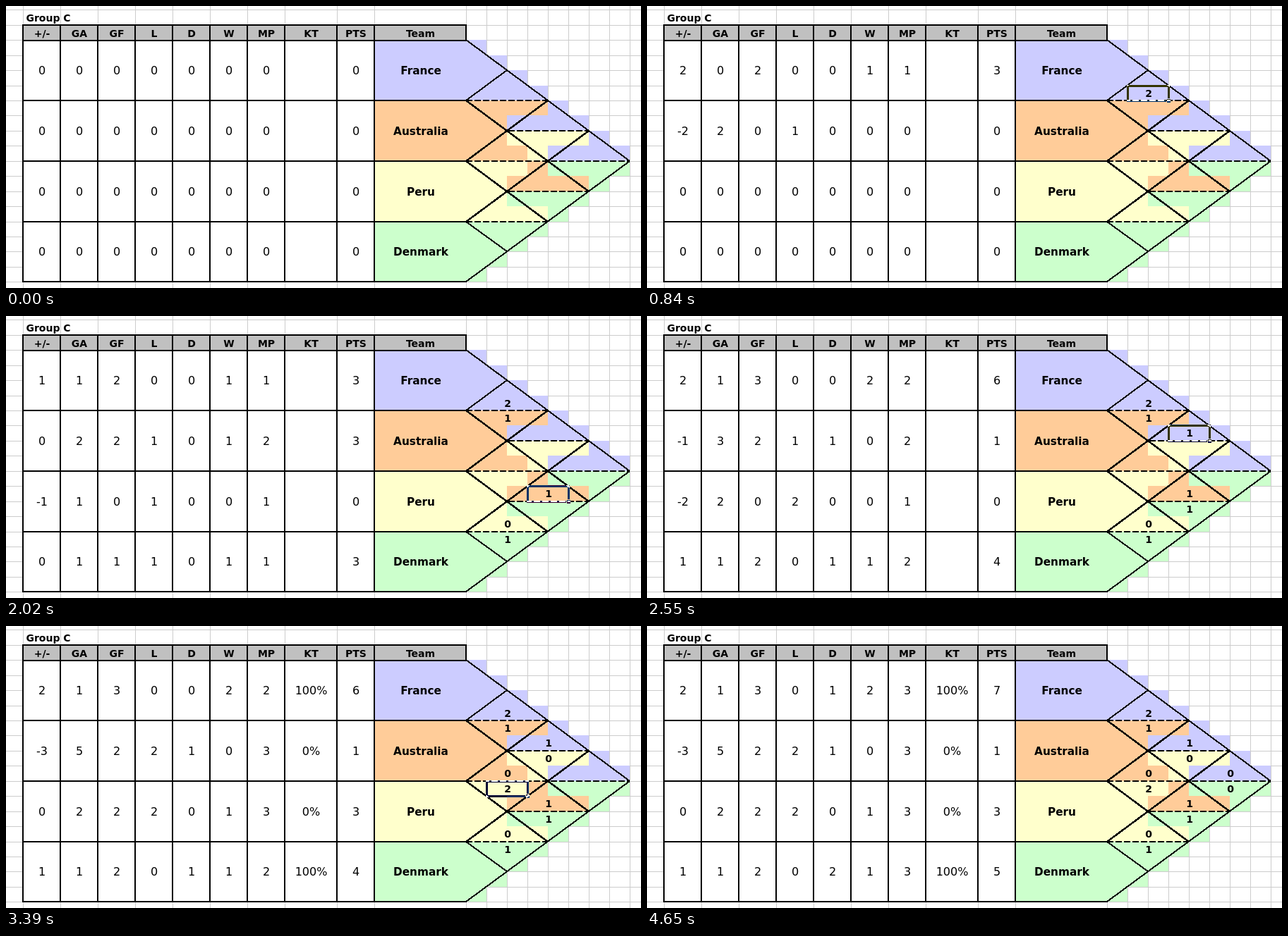
Write an HTML page that moves like this. It is 900 by 400 pixels and loops after 4.7 s.

```html
<!DOCTYPE html>
<html lang="en">
<head>
<meta charset="utf-8">
<title>Group C table</title>
<style>
  html, body { margin: 0; width: 100%; height: 100%; overflow: hidden; background: #fff; }
  svg { display: block; width: 900px; height: 400px; font-family: "DejaVu Sans", Verdana, sans-serif; }
  text { text-anchor: middle; font-size: 16px; }
  .head, .score { font-size: 14px; font-weight: bold; }
  .team { font-size: 15.3px; font-weight: bold; }
  .grid { stroke: #ccc; stroke-width: 1; }
  .rule { stroke: #000; stroke-width: 2; fill: none; }
  .bold { stroke-width: 2.5; }
  .crisp { shape-rendering: crispEdges; }
  #cursor { mix-blend-mode: difference; }
</style>
</head>
<body>
<svg id="stage" viewBox="0 0 900 400">
  <rect width="900" height="400" fill="#fff"/>
  <g id="sheet"></g>
  <g id="values"></g>
  <g id="cursor" class="crisp" fill="#fff"></g>
</svg>
<script>
const LOOP = 4700;
const COLS = [24, 77, 130, 183, 236, 289, 342, 395, 469, 522, 652];
const ROWS = [27, 49, 134, 220, 306, 391];
const HEADS = ["+/-", "GA", "GF", "L", "D", "W", "MP", "KT", "PTS", "Team"];
const TEAMS = ["France", "Australia", "Peru", "Denmark"];
const FILLS = { B: "#ccccff", O: "#ffcc99", Y: "#ffffcc", G: "#ccffcc" };
const BASELINES = [97, 183, 269, 354];

// Upper half of the stepped fill; the lower half mirrors it with swapped teams.
const STEPS = ["B", "BB", "BBB", "BBBB", "OOOOB", "OOBBBB", "OOYYYYB", "OOOYBBBB"];
const SWAP = { B: "G", O: "Y", Y: "O" };

// Teams, then the centre of the diamond in small cells.
const MATCHES = [
  { teams: [0, 1], c: 2, r: 4 },
  { teams: [2, 3], c: 2, r: 12 },
  { teams: [1, 3], c: 4, r: 10 },
  { teams: [0, 2], c: 4, r: 6 },
  { teams: [1, 2], c: 2, r: 8 },
  { teams: [0, 3], c: 6, r: 8 }
];
const GOALS = [2, 1, 0, 1, 1, 1, 1, 0, 0, 2, 0, 0];
const TIMES = [840, 1050, 1380, 1680, 2020, 2230, 2550, 2850, 3100, 3390, 3810, 4040];
const SELECT_START = 300, SELECT_END = 4650;
const CHANCES = [
  { text: "100%", from: 8 }, { text: "0%", from: 9 },
  { text: "0%", from: 8 }, { text: "100%", from: 9 }
];

const cellX = c => 652 + 29 * c;
const cellY = r => Math.round(48.2 + 21.445 * r);
const midCol = i => (COLS[i] + COLS[i + 1]) / 2 + 0.5;
const byId = id => document.getElementById(id);

const rect = (x, y, w, h, fill) =>
  `<rect x="${x}" y="${y}" width="${w}" height="${h}"${fill ? ` fill="${fill}"` : ""}/>`;
const line = (x1, y1, x2, y2, extra = "") =>
  `<path d="M${x1} ${y1}L${x2} ${y2}" ${extra}/>`;
const label = (x, y, text, cls = "") => `<text x="${x}" y="${y}" class="${cls}">${text}</text>`;

function drawGrid() {
  let out = "";
  for (const x of COLS) out += line(x + 0.5, 0, x + 0.5, 400);
  for (let c = 1; c <= 8; c++) out += line(cellX(c) + 0.5, 0, cellX(c) + 0.5, 400);
  for (let r = -2; r <= 16; r++) out += line(0, cellY(r) + 0.5, 900, cellY(r) + 0.5);
  return `<g class="grid crisp">${out}</g>`;
}

function drawFills() {
  let out = rect(24, 49, 498, 342, "#fff") + rect(24, 27, 628, 22, "#c0c0c0");
  Object.values(FILLS).forEach((fill, i) => {
    out += rect(522, ROWS[i + 1], 130, ROWS[i + 2] - ROWS[i + 1], fill);
  });
  const lower = STEPS.map(s => s.replace(/./g, k => SWAP[k])).reverse();
  [...STEPS, ...lower].forEach((row, r) => {
    const y = cellY(r), h = cellY(r + 1) - y;
    [...row].forEach((key, c) => {
      out += rect(cellX(c), y, cellX(c + 1) - cellX(c), h, FILLS[key]);
    });
  });
  return `<g class="crisp">${out}</g>`;
}

function drawRules() {
  let out = "";
  for (const y of ROWS) out += line(23, y, 653, y);
  COLS.forEach((x, i) => { out += line(x, 27, x, i < 10 ? 391 : 49); });
  // All dashes share one phase across the sheet.
  for (const m of MATCHES) {
    const x = cellX(m.c - 2), y = cellY(m.r);
    out += line(x, y, cellX(m.c + 2), y,
      `stroke-dasharray="9 3" stroke-dashoffset="${x - cellX(0)}"`);
  }
  const slant = ([r, c, to]) => line(cellX(0), cellY(r), cellX(c), cellY(to));
  const outer = [[0, 8, 8], [4, 2, 2], [12, 2, 14], [16, 8, 8]].map(slant).join("");
  const inner = [[4, 6, 10], [8, 4, 4], [8, 4, 12], [12, 6, 6]].map(slant).join("");
  return `<g class="rule crisp">${out}${outer}<g class="bold">${inner}</g></g>`;
}

function drawLabels() {
  let out = label(60, 22, "Group C", "head");
  HEADS.forEach((h, i) => { out += label(midCol(i), 44, h, "head"); });
  TEAMS.forEach((t, i) => { out += label(588, BASELINES[i], t, "team"); });
  return out;
}

// Blank scores count as zero for goals and losses, but not as a match played.
function standings(count) {
  const rows = TEAMS.map(() => ({ ga: 0, gf: 0, l: 0, d: 0, w: 0, mp: 0 }));
  MATCHES.forEach((m, i) => {
    m.teams.forEach((team, side) => {
      const own = 2 * i + side, other = 2 * i + 1 - side;
      const played = own < count;
      const gf = played ? GOALS[own] : 0;
      const ga = other < count ? GOALS[other] : 0;
      const row = rows[team];
      row.gf += gf;
      row.ga += ga;
      if (gf < ga) row.l++;
      if (gf > ga) row.w++;
      if (played && gf === ga) row.d++;
      if (played) row.mp++;
    });
  });
  return rows.map((s, i) => [
    s.gf - s.ga, s.ga, s.gf, s.l, s.d, s.w, s.mp,
    count >= CHANCES[i].from ? CHANCES[i].text : "",
    3 * s.w + s.d
  ]);
}

const slot = i => {
  const m = MATCHES[i >> 1];
  return { c: m.c, r: m.r - 1 + i % 2 };
};

function drawValues(count) {
  let out = "";
  standings(count).forEach((row, i) => {
    row.forEach((v, col) => { out += label(midCol(col), BASELINES[i], v); });
  });
  for (let i = 0; i < count; i++) {
    const { c, r } = slot(i);
    out += label(cellX(c) + 1, cellY(r) + 15.5, GOALS[i], "score");
  }
  return out;
}

// White shapes, inverted against the sheet by the blend mode.
function drawCursor(i) {
  if (i < 0) return "";
  const { c, r } = slot(i);
  const x1 = cellX(c - 1), x2 = cellX(c + 1), y1 = cellY(r), y2 = cellY(r + 1);
  return rect(x1 - 1, y1 - 1, x2 - x1 + 3, 3) +
    rect(x1 - 1, y1 + 2, 3, y2 - y1) +
    rect(x2 - 1, y1 + 2, 3, y2 - y1 - 5) +
    rect(x1 + 2, y2 - 1, x2 - x1 - 5, 3) +
    rect(x2 - 2, y2 - 2, 5, 5);
}

byId("sheet").innerHTML = drawGrid() + drawFills() + drawRules() + drawLabels();

let shown = "";
function update(t) {
  const count = TIMES.filter(at => at <= t).length;
  const selected = t >= SELECT_START && t < SELECT_END ? Math.max(0, count - 1) : -1;
  const key = count + "/" + selected;
  if (key === shown) return;
  shown = key;
  byId("values").innerHTML = drawValues(count);
  byId("cursor").innerHTML = drawCursor(selected);
}

const start = performance.now();
function tick() {
  update((performance.now() - start) % LOOP);
  requestAnimationFrame(tick);
}
update(0);
requestAnimationFrame(tick);
</script>
</body>
</html>
```
